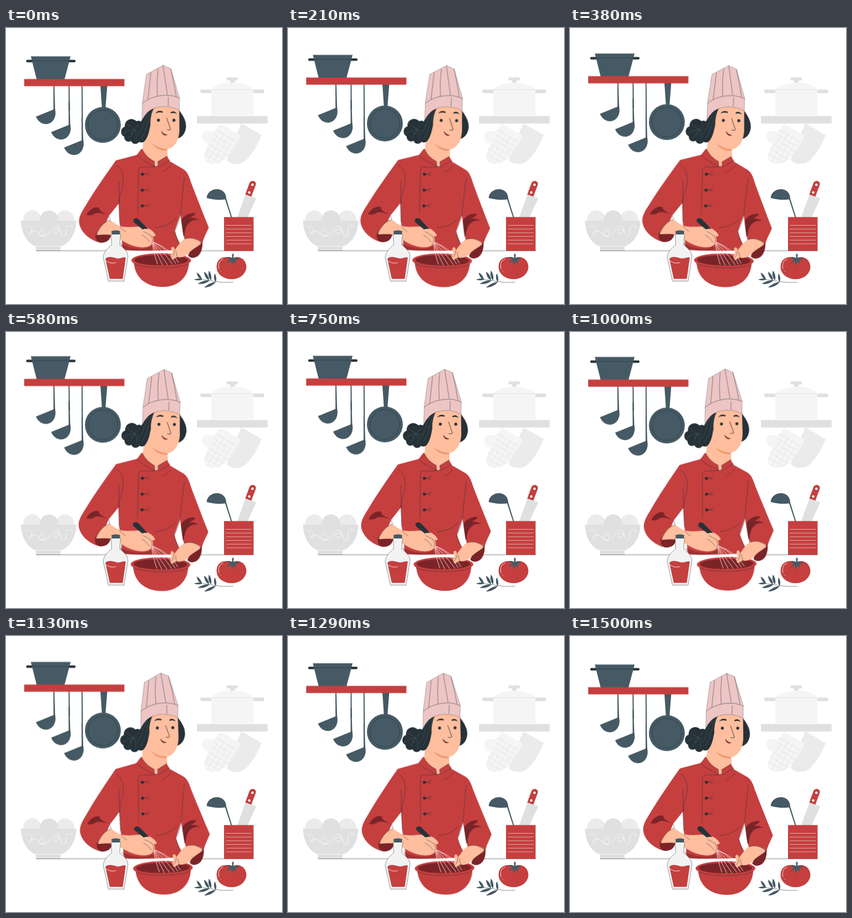
An HTML page for the animation above (1540 ms loop, 500x500 px).

```html
<!DOCTYPE html>
<html lang="en">
<head>
<meta charset="utf-8">
<title>Chef whisking</title>
<style>
html, body { margin: 0; width: 100%; height: 100%; overflow: hidden; background: #fff; }
svg { display: block; width: 100vw; height: 100vh; }
.red { fill: #c53f3f; }
.deep { fill: #7b2428; }
.steel { fill: #455a64; }
.ink { fill: #263238; }
.skin { fill: #ffbe9d; }
.g1 { fill: #f5f5f5; }
.g2 { fill: #ebebeb; }
.g3 { fill: #e0e0e0; }
.line { fill: none; stroke: #263238; stroke-width: .55; stroke-linecap: round; stroke-linejoin: round; }
.white { fill: none; stroke: #fff; stroke-width: .8; stroke-linecap: round; }
.strand { fill: none; stroke: #5d6f78; stroke-width: .45; }
#chef { transform-origin: 252px 267px; }
</style>
</head>
<body>
<svg viewBox="0 0 500 500">
  <defs>
    <pattern id="quilt" width="9.5" height="9.5" patternUnits="userSpaceOnUse" patternTransform="rotate(31)">
      <path d="M0 0H9.5M0 0V9.5" fill="none" stroke="#e0e0e0" stroke-width="1.2"/>
    </pattern>
    <g id="ladle">
      <path class="steel" d="M54.5 161L86 148L85.8 105H87.7L88.9 147.5C92 160 86 172 75 174C66 175 58 170 54.5 161Z"/>
      <path class="line" d="M54.5 161L88.5 147.5"/>
    </g>
    <path id="leaf" class="steel" d="M0 0C-4 -5 -3 -13 0 -18C3 -12 2.500 -5 0 0Z"/>
  </defs>

  <!-- right shelf, pot, mitts -->
  <path class="g3" d="M346 159.5H474V173H346Z"/>
  <g class="g3">
    <rect x="352" y="111.5" width="25" height="6.5" rx="3"/>
    <rect x="443" y="111.5" width="25" height="6.5" rx="3"/>
    <rect x="399.5" y="89.5" width="20.5" height="5.5" rx="2.5"/>
    <path d="M406 94H414V101H406Z"/>
  </g>
  <path class="g1" d="M372 159.5V112C378 103 394 99 410 99S442 103 448 112V159.5Z"/>
  <path d="M373 111.5H447" stroke="#e0e0e0" stroke-width=".8"/>
  <path id="mitt" class="g2" d="M427 173L463 194C455 213 447 227 437 237C427 249 408 249 400 239L408 212Z"/>
  <use href="#mitt" fill="url(#quilt)" opacity=".5"/>
  <path class="g1" d="M388 173L425 196C418 212 406 228 396 238C386 248 367 249 360 238C357 228 362 220 367 210C360 208 354 201 356 193C358 186 367 185 376 188Z"/>
  <path d="M383 181L419 204C414 216 404 229 396 238C386 248 367 249 360 238C357 228 362 220 367 210L373 199Z" fill="url(#quilt)"/>

  <!-- egg bowl -->
  <g class="g2"><circle cx="47.5" cy="347" r="16.5"/><circle cx="107" cy="347" r="16.5"/></g>
  <circle class="g3" cx="78" cy="347" r="16.5"/>
  <path class="g3" d="M27 349H127.5C127 374 114 391 99 395.5V404H54V395.5C40 391 28 374 27 349Z"/>
  <path class="white" d="M54 395.5H99"/>
  <path class="white" d="M36 361C43 355 49 364 46 372C43 377 39 371 45 369C53 364 56 372 62 376C71 381 73 369 67 366C60 364 57 374 65 377C76 380 82 362 90 359C99 357 99 370 91 372C85 373 85 365 92 364C103 364 97 380 106 377C113 373 104 362 112 359C116 357 120 359 120 362"/>

  <path class="line" d="M55 403.7H195M340 403.7H448"/>

  <!-- utensil box -->
  <path class="g3" d="M434 301L453.5 308.5L437 344H418.5Z"/>
  <path class="red" d="M433.5 301.5L441 281C443 276 449 276 451.5 279C453 281 453 283 452 285.5L444.5 305.5Z"/>
  <g fill="#fff"><circle cx="446.5" cy="284" r="2.3"/><circle cx="440.7" cy="298" r="2.3"/></g>
  <path class="steel" d="M363.5 308C364 298 373 292 382 292C392 292 399 299 399 309L409.5 343H407.5L397 310.5C385 312 374 311 363.5 308Z"/>
  <path class="red" d="M395 342.5H448.5V404H395Z"/>
  <path d="M398 357.5H445M398 364.2H445M398 371H445M398 377.6H445M398 384.3H445M398 391H445" stroke="#f3d9d9" stroke-width=".7"/>

  <!-- tomato and sprig -->
  <path class="red" d="M411 417C423 411 436 420 435.5 434C434 447 422 455 409 455C395 455 382 447 381.5 433C381 419 393 411 411 417Z"/>
  <path class="white" d="M386 436C383 428 387 421 393 418.5M389 440.5L389.3 441"/>
  <path class="steel" d="M409.8 409L413 409.5Q411.500 413 412.500 416.500Q418 415 424 418.500Q419 419 415.500 420.500Q416.500 423 416 427Q413 425 411.800 422.500Q410.500 427 411 431Q407.500 427 408 422Q404 423 400.500 427Q401.500 421.500 406 419Q402 417.500 399 415Q405 414 410 416.500Q409 413 409.800 409Z"/>
  <path class="line" d="M345 456C364 454 385 463.500 411 460.500" stroke="#455a64"/>
  <use href="#leaf" transform="translate(355 456) rotate(-36) scale(.9)"/>
  <use href="#leaf" transform="translate(368 457) rotate(-30)"/>
  <use href="#leaf" transform="translate(371.500 457) rotate(-12)"/>
  <use href="#leaf" transform="translate(380 460) rotate(-7) scale(.85)"/>
  <use href="#leaf" transform="translate(356 455) rotate(-93) scale(.7 .85)"/>
  <use href="#leaf" transform="translate(369 457) rotate(-107) scale(1 1.25)"/>
  <use href="#leaf" transform="translate(380 460) rotate(-116) scale(1 1.3)"/>

  <!-- hanging shelf -->
  <g id="shelf">
    <g class="ink"><rect x="36.5" y="57.8" width="18" height="4.5" rx="2.2"/><rect x="108" y="57.8" width="18" height="4.5" rx="2.2"/></g>
    <path class="steel" d="M45 51.5H117L106 93H55.500Z"/>
    <path class="line" d="M47 59.5H114.5"/>
    <use href="#ladle"/>
    <use href="#ladle" x="27.5" y="28"/>
    <use href="#ladle" x="51" y="56"/>
    <path class="steel" d="M113.300 104H115.200L115.900 150H113.600ZM136.800 104H138.700L139.300 180H137.100Z"/>
    <path class="steel" d="M171 104H183.5L180 148H174Z"/>
    <circle class="steel" cx="175.5" cy="175.8" r="32.5"/>
    <circle class="line" cx="175.5" cy="175.8" r="27"/>
    <path class="red" d="M33 92.5H214.5V105.500H33Z"/>
  </g>

  <g id="chef">
    <!-- hair behind -->
    <g class="ink">
      <circle cx="227" cy="177" r="12"/><circle cx="218" cy="188" r="9.8"/><circle cx="222" cy="198" r="8"/>
      <circle cx="234" cy="202" r="8"/><circle cx="242" cy="188" r="15"/><circle cx="240" cy="177" r="9"/>
      <path d="M313 148C319 157 326 165 326 179C325 191 318 199 310 200L300 160Z"/>
    </g>
    <path class="strand" d="M232 184Q222 178 216 172M232 184Q220 186 212 192M232 184Q228 194 222 200M232 184Q238 194 236 205M232 184Q240 174 248 172M232 184Q244 188 250 196"/>

    <!-- jacket -->
    <path class="red" d="M245 219L237 230L199 240C182 264 161 294 145 321C136 335 132 343 132.500 352C134 367 147 381 166 388L187 340L204.500 318L206 352L212 402Q245 405 312 402L315 390C311 382 308 374 306 367L316 338C318 352 320 368 324 384Q341 376 356 390C358 380 364 370 367.500 361C357 335 345 305 335 279C332 269 329 261 322 256L296 241L291 232L270 251Z"/>
    <path class="deep" d="M146 339C150 330 160 323 169 325.500C168 331 176 335 185 339C174 336 166 333 160 337C156 340 150 340 146 339Z"/>
    <path class="deep" d="M318 348C322 339 335 333 344 335.500C341 340 336 342 333 344C340 343 346 345 350 348C338 346 330 352 326 362L322 378C320 368 319 358 318 348Z"/>
    <path class="deep" d="M208 390C218 396 228 399 246 400Q256 400 264 395L266 401Q240 405 212 402Z" opacity=".5"/>

    <!-- neck and head -->
    <path class="skin" d="M251 185L247 222L269 250H276L293 235L292 212Z"/>
    <path fill="#eb996e" d="M262 205C271 215 282 219 292.500 217L292 221.500C279 223 268 217 262 205Z"/>
    <path class="skin" d="M266 143C285 137 306 141 313.500 148L314 184C314 202 305 218 292 219C277 219 262 210 254 197L257 165Z"/>
    <path class="ink" d="M246 166C250 154 259 144 269 142C263 154 261 164 261.500 175C259 188 257 199 250 206C246 209 239 207 236 203L241 178Z"/>
    <path class="strand" d="M264 150C256 164 256 184 245 199M258 154C248 168 250 182 238 194"/>
    <path fill="#edc5c5" stroke="#263238" stroke-width=".35" stroke-linejoin="round" d="M254 84L284 67.500L298 73.500L314 126.500L313.500 149C296 139 269 140 256 153Q250 159 246 167.500L247 134Z"/>
    <path class="line" d="M247 136.500C260 124 292 116 314 127M262 81L257 129M275 74Q272 98 274 123M284 68Q288 94 292 120.500M298 74Q304 98 308 123.500M294 126L293.500 141"/>
    <g class="ink"><circle cx="276" cy="167" r="2.700"/><circle cx="304" cy="167" r="2.700"/></g>
    <path class="ink" d="M270 155C273 150 279 148.500 284 151.500L283.500 153.500C279 152 274 152.500 270 155ZM298 152.500C302 149.500 307 151 309.500 156C306 153.500 302 153 298 154.500Z"/>
    <path class="line" d="M291 163L298 183.500Q295 186 291.500 184" style="stroke-width:.9"/>
    <path class="deep" d="M281.500 187.500C283 194 288 196 292 193.500C288 193 285 191 283 188.500Z"/>
    <path class="line" d="M281 188.500L283 187M282 188C285 192 288 193.500 292 193.500"/>

    <!-- collar, seams, buttons -->
    <path class="red" d="M246.500 219L237 230L270 252L276 251.500L297 241L291.500 232L275 242L275.500 249L269.500 251L268.500 241.500C258 236 251 229 246.500 219Z"/>
    <path class="line" d="M246.500 219C251 229 258 236 268.500 241.500L269.500 251M237 230C246 240 258 245 269.500 251M275.500 249L275 242L291.500 232M276 251.500L296 240M270 251.500L246 252Q240 252 240 258L239 337"/>
    <path class="line" d="M200 249C212 257 214 272 211.500 287C209 299 204 307 204.500 318L206 352M205 279Q204 299 206 318M323 271C321 294 317 318 316 340C313 351 310 360 306 367C308 378 311 385 315 390M309 345C299 355 287 360 271 362M299 249Q290 258 283 261M332 347Q321 353 323 376"/>
    <g class="ink"><circle cx="247" cy="265" r="2.700"/><circle cx="247" cy="293.700" r="2.700"/><circle cx="247" cy="322.300" r="2.700"/></g>
    <path class="line" d="M249 265L260 262M249 265L258 266.500M249 293.700L260 290.700M249 293.700L258 295.200M249 322.300L260 319.300M249 322.300L258 323.800"/>

    <!-- mixing bowl -->
    <path class="red" d="M232 424C233 449 251 469 284 469C314 469 331 450 332 424Z"/>
    <ellipse class="red" cx="281.500" cy="421" rx="54" ry="13"/>
    <ellipse class="deep" cx="281.500" cy="420.500" rx="48.500" ry="9.500"/>
    <path class="line" d="M232 427C248 436 314 437 331 427"/>
    <path class="white" d="M265 387Q268 409 275 428M265 387Q273 409 284 429.500M265 387Q279 409 293 429M265 387Q286 405 302 428M266 387Q296 402 308 427M266 387Q302 402 313 425"/>

    <!-- left arm, whisk handle -->
    <path class="deep" d="M163 372C161 380 164 388 170 389C180 390 189 386 191 374Z"/>
    <path class="skin" d="M189 348C196 353 201 357 207 359C222 363 239 358 251 361C262 363 269 370 271 375C270 379 266 377 265 376C269 382 268 389 264 392C257 399 244 398 234 395.500C216 391 203 379 190 375C181 374 172 375 164 375C169 362 177 352 189 348Z"/>
    <path class="line" d="M187 341C188 345 190 348 189 348C177 352 169 362 164 375M207 360Q211 366 217 369"/>
    <path class="ink" d="M231 348C232 344 237 344 240 346L263 370L259 374L233 353C231 351 230.500 350 231 348Z"/>
    <path class="skin" d="M248 365C256 361 266 367 271 375C269 379 264 377 262 375C266 380 267 387 264 391C257 390 250 381 244 375Z"/>
    <path class="line" d="M262 375C266 380 267 387 264 391M250 369Q257 372 262 376M247 375Q256 380 261 388"/>

    <!-- right arm -->
    <path class="deep" d="M356 388C357 399 353 412 344 415C339 417 334 417 330 412L340 390Z"/>
    <path class="skin" d="M324 382C316 387 312 394 306 402C306 397 302 395 300 398C299 401 301 405 301 408C297 411 299 417 302 419.500C305 419 307 415 311 415C321 417 329 411 334 405C340 399 348 396 354 390Q341 376 324 382Z"/>
    <path class="line" d="M306 402C306 407 304 412 301 415M311 415Q308 409 309 405M324 382Q341 376 355 390"/>
  </g>

  <!-- bottle -->
  <path d="M190.500 373.500H207.500L206 393C214 399 221 406 221 414L214 458.500H185.500L176 415C177 406 184 399 191.500 393Z" fill="#f2f2f2" stroke="#263238" stroke-width=".5" stroke-linejoin="round"/>
  <path class="red" d="M180 418C185 413 193 415 199 417C206 419 212 414 217 416L211.500 454.500H188Z"/>
  <path class="white" d="M181 422Q190 428 199 425M181 409Q184 403 190 399"/>
  <path class="steel" d="M191 368Q199 365 207 368L206 374H192Z"/>
</svg>
<script>
const LOOP = 1540;
const SINE = 'cubic-bezier(.37, 0, .63, 1)';
const GLIDE = 'cubic-bezier(.35, .25, .65, .95)';

// Each part swings between two poses; lead is how far in it starts.
function swing(id, from, to, lead, easing) {
  document.getElementById(id).animate(
    [{ transform: from }, { transform: to }],
    { duration: LOOP / 2, delay: -lead, iterations: Infinity, direction: 'alternate', easing: 'linear' }
  ).effect.updateTiming({ easing: 'linear' });
  document.getElementById(id).getAnimations()[0].effect.setKeyframes(
    [{ transform: from, easing }, { transform: to }]
  );
}
swing('shelf', 'translateY(.2px)', 'translateY(-8.4px)', 40, GLIDE);
swing('chef', 'rotate(-1.03deg)', 'rotate(1.03deg)', 415, SINE);
</script>
</body>
</html>
```
